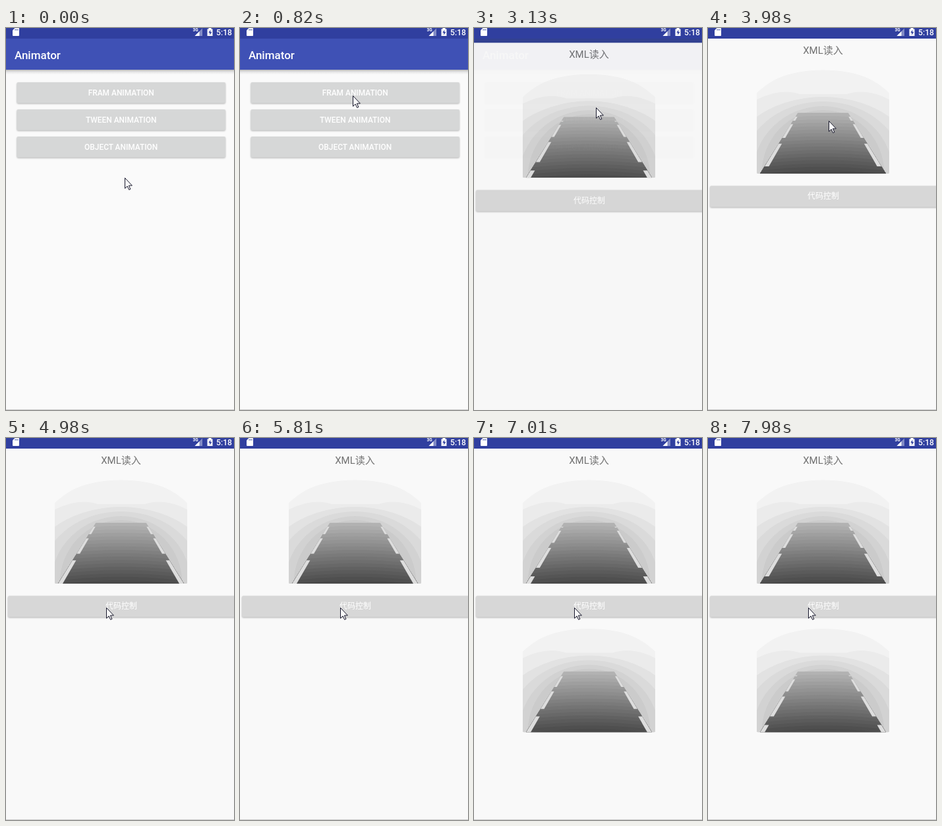
These frames come from a looping animation (346x577 px, 8 s). An HTML page:

```html
<!DOCTYPE html>
<html lang="en">
<head>
<meta charset="utf-8">
<title>Animator</title>
<style>
  html, body { margin: 0; width: 100%; height: 100%; overflow: hidden; background: #fafafa; }
  svg { display: block; width: 346px; height: 577px; }
  text { font-family: Roboto, "Noto Sans CJK SC", "Noto Sans CJK", sans-serif; }
  .label { font-size: 11.9px; font-weight: 500; fill: #fff; text-anchor: middle; }
  .button { fill: #d6d7d7; filter: drop-shadow(0 1px 1px rgba(0, 0, 0, .28)); }
</style>
</head>
<body>
<svg viewBox="0 0 346 577">
  <defs>
    <linearGradient id="barShadow" x2="0" y2="1">
      <stop stop-color="#000" stop-opacity=".26"/>
      <stop offset=".45" stop-color="#000" stop-opacity=".09"/>
      <stop offset="1" stop-color="#000" stop-opacity="0"/>
    </linearGradient>
    <clipPath id="arch">
      <path d="M74 98C90 84 112 64 174.5 63.5C237 64 259 84 275 98V218q0 2-2 2H76q-2 0-2-2Z"/>
    </clipPath>
    <clipPath id="road"><path d="M136.5 128H212.5L270 220H79Z"/></clipPath>
    <g id="tunnel" clip-path="url(#arch)"></g>
  </defs>

  <g id="menu">
    <rect width="346" height="577" fill="#fafafa"/>
    <rect y="63" width="346" height="7" fill="url(#barShadow)"/>
    <rect y="16" width="346" height="47" fill="#3f51b5"/>
    <text x="13" y="46.5" font-size="17" font-weight="500" fill="#fff">Animator</text>
    <g id="menuButtons"></g>
    <rect y="576" width="346" height="1" fill="#cbcbcb"/>
    <rect id="dim" y="16" width="346" height="561" opacity="0"/>
  </g>

  <g id="detail">
    <rect y="16" width="346" height="561" fill="#f9f9f9"/>
    <text x="174.5" y="39" font-size="15" fill="#737373" text-anchor="middle">XML读入</text>
    <use href="#tunnel"/>
    <g id="dashes1"></g>
    <rect id="codeButton" class="button" x="3" y="238.5" width="348" height="32" rx="2"/>
    <text class="label" x="175" y="258.3" style="font-size:12px;font-weight:400">代码控制</text>
    <g id="second" transform="translate(0 224.5)">
      <use href="#tunnel"/>
      <g id="dashes2"></g>
    </g>
    <rect y="576" width="346" height="1" fill="#cbcbcb"/>
  </g>

  <rect width="346" height="16" fill="#303f9f"/>
  <g fill="#fff">
    <path d="M13.5 0H19q1 0 1 1V11q0 1-1 1H11q-1 0-1-1V3.5Z"/>
    <path d="M14 1.5v2.2M16 1.5v2.2M18 1.5v2.2" stroke="#303f9f" stroke-width=".9"/>
    <text x="283.5" y="5" font-size="6.5" font-weight="700">3G</text>
    <path d="M286.5 12L298 .5V12Z" opacity=".4"/>
    <path d="M286.5 12L293.5 5V12Z"/>
    <path d="M307.5 0h4v1.5h2V12h-8V1.5h2Z"/>
    <path d="M310.3 2.8l-3 4.5h2v3.4l3-4.6h-2Z" fill="#303f9f"/>
    <text x="319" y="11" font-size="12.2" font-weight="500">5:18</text>
  </g>

  <path id="cursor" d="M.5 .5V16.3L4.1 12.9L6.7 18.4L8.9 17.4L6.4 12H11.4Z"
        fill="#fafafa" stroke="#17172b" stroke-linejoin="round"/>
</svg>

<script>
const LOOP = 8000, OPEN = 3130, SECOND = 6500;
const MID = 174.5, HORIZON = 128, FLOOR = 220;
const $ = id => document.getElementById(id);
const gray = v => `rgb(${v},${v},${v})`;
const clamp = v => Math.max(0, Math.min(1, v));

// [time, x, y], each held until the next
const cursorPath = [
  [0, 180, 226], [130, 168, 208], [270, 154, 180], [410, 146, 150], [540, 150, 126],
  [680, 160, 108], [820, 171, 102], [1600, 186, 97], [2050, 179, 108], [2240, 181, 116],
  [2420, 185, 120], [3970, 183, 140], [4110, 176, 165], [4270, 169, 188], [4410, 165, 203],
  [4710, 158, 230], [4840, 153, 248], [4980, 152, 256]
];
// [time, vertical offset, opacity] of the opening screen
const opening = [[OPEN, 6.3, .96], [3260, 1.5, .99], [3410, 0, 1]];
const held = (list, t) => list.filter(k => k[0] <= t).pop();

$('menuButtons').innerHTML = ['FRAM', 'TWEEN', 'OBJECT'].map((name, i) => {
  const y = 82 + 41 * i;
  return `<rect class="button" x="16.5" y="${y}" width="316.5" height="31.5" rx="2"/>
    <text class="label" x="174.7" y="${y + 20.2}">${name} ANIMATION</text>`;
}).join('');

function drawTunnel() {
  const walls = [[226, 104, 150], [218, 111, 125], [210, 118, 106], [203, 124, 93]];
  let out = `<rect x="74" y="63" width="201" height="157" fill="${gray(242)}"/>
    <path d="M74 108Q110 90 140 100H210Q240 90 275 108V220H74Z" fill="${gray(235)}"/>`;
  for (const [shade, top, rx] of walls)
    out += `<ellipse cx="${MID}" cy="${FLOOR}" rx="${rx}" ry="${FLOOR - top}" fill="${gray(shade)}"/>`;
  out += '<g clip-path="url(#road)">';
  const bands = 18;
  for (let i = -2; i < bands; i++) {
    const y = HORIZON + i * 92 / bands;
    out += `<path d="M70 ${y + 7}Q${MID} ${y - 7} 279 ${y + 7}V221H70Z"
      fill="${gray(Math.round(178 - i * 6.2))}"/>`;
  }
  $('tunnel').innerHTML = out + '</g>';
}

// Road markings grow with perspective as their phase advances
const depthY = p => Math.max(134, Math.min(FLOOR, 100 + 40 * 1.65 ** (p / 4)));
const edge = (y, half) => half * (y - 67) / 153;

function dashes(phase) {
  let d = '';
  for (let p = phase - 4; p < 10; p += 4) {
    const top = depthY(p), bottom = depthY(p + 3);
    if (bottom <= top) continue;
    for (const side of [-1, 1]) {
      const x = (y, half) => (MID + side * edge(y, half)).toFixed(1);
      d += `M${x(top, 95.5)} ${top}L${x(top, 88.5)} ${top}` +
           `L${x(bottom, 88.5)} ${bottom}L${x(bottom, 95.5)} ${bottom}Z`;
    }
  }
  return `<path d="${d}" fill="${gray(221)}"/>`;
}

const shown = {};
function setDashes(id, step) {
  const phase = step % 4;
  if (shown[id] === phase) return;
  shown[id] = phase;
  $(id).innerHTML = dashes(phase);
}

function render(t) {
  const [, cx, cy] = held(cursorPath, t);
  $('cursor').setAttribute('transform', `translate(${cx} ${cy})`);

  const state = held(opening, t);
  $('detail').style.display = state ? '' : 'none';
  $('dim').setAttribute('opacity', state ? .2 : 0);
  if (!state) return;
  $('detail').setAttribute('transform', `translate(0 ${state[1]})`);
  $('detail').setAttribute('opacity', state[2]);
  setDashes('dashes1', Math.floor((t - OPEN) / 200 + .8));

  const press = clamp((t - 6200) / 140) * clamp((6760 - t) / 240);
  const button = $('codeButton');
  button.style.filter =
    `drop-shadow(0 ${1 + press}px ${1 + press}px rgba(0,0,0,${.28 + .12 * press}))`;
  button.style.fill = gray(Math.round(215 - 4 * press));

  $('second').style.display = t >= SECOND ? '' : 'none';
  if (t >= SECOND) setDashes('dashes2', 1 + Math.floor((t - SECOND) / 200));
}

drawTunnel();
const start = performance.now();
function tick() {
  render((performance.now() - start) % LOOP);
  requestAnimationFrame(tick);
}
tick();
</script>
</body>
</html>
```
